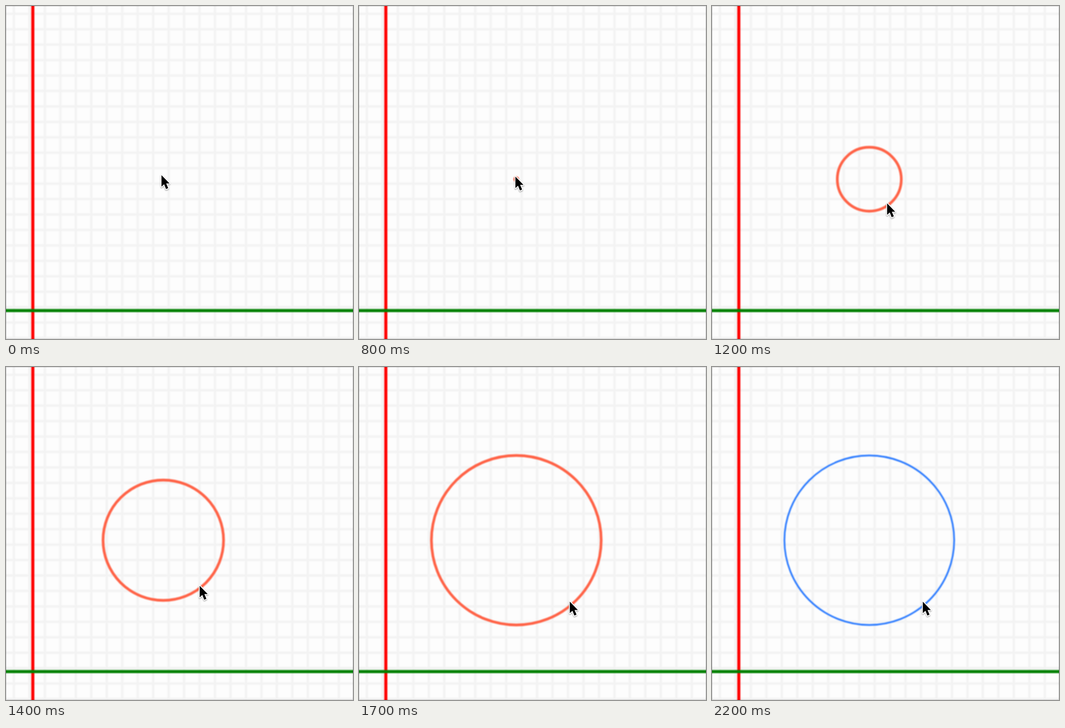
An HTML page for the animation above (2300 ms loop, 722 by 694 pixels).

```html
<!DOCTYPE html>
<html lang="en">
<head>
<meta charset="utf-8">
<style>
  html, body { margin: 0; width: 100%; height: 100%; overflow: hidden; background: #fdfdfd; }
  svg { display: block; }
</style>
</head>
<body>
<svg width="722" height="694" viewBox="0 0 722 694">
  <defs>
    <filter id="soft" filterUnits="userSpaceOnUse" x="-20" y="-20" width="762" height="734"
      color-interpolation-filters="sRGB">
      <feGaussianBlur stdDeviation="1"/>
    </filter>
    <filter id="shadow" x="-50%" y="-50%" width="200%" height="200%" color-interpolation-filters="sRGB">
      <feDropShadow dx="0" dy="1.5" stdDeviation="1.2" flood-color="#000" flood-opacity="0.35"/>
    </filter>
  </defs>
  <rect width="722" height="694" fill="#fdfdfd"/>
  <g filter="url(#soft)" fill="none">
    <path id="grid" stroke="#f3f3f3" stroke-width="5"/>
    <path d="M55.8-10V710" stroke="#f00" stroke-width="6.4"/>
    <path d="M-10 634.7H740" stroke="#008000" stroke-width="6.4"/>
    <circle id="anchor" cx="327" cy="361" r="5" fill="#ff6347" opacity="0.4"/>
    <circle id="ring" cx="327.3" cy="361"/>
  </g>
  <rect x="0.5" y="0.5" width="721" height="693" fill="none" stroke="#000" stroke-opacity="0.18"/>
  <g id="cursor" filter="url(#shadow)">
    <path d="M0.5 0.5V24.5L6 19.5L10 29.5L14.5 27.5L10.3 17.8H17.3Z"
      fill="#000" stroke="#fff" stroke-width="3.6" stroke-linejoin="round" paint-order="stroke"/>
  </g>
</svg>
<script>
  const LOOP = 2300, STEP = 100, DRAG_START = 700, PEAK = 1950, COMMIT = 2200;
  const byId = id => document.getElementById(id);
  const ring = byId('ring'), anchor = byId('anchor'), cursor = byId('cursor');

  let lines = '';
  for (let i = 0; i < 22; i++) {
    const offset = 32.18 * i;
    lines += `M${16.6 + offset}-10V710M-10 ${16.2 + offset}H740`;
  }
  byId('grid').setAttribute('d', lines);

  // The drag accelerates, then drifts slightly past the final size and back
  function radiusAt(t) {
    const growing = 66.6 * (Math.max(0, t - DRAG_START) / 500) ** 1.88;
    const settling = 181 - 7e-5 * (t - PEAK) ** 2;
    return t > DRAG_START ? Math.min(growing, settling) : 0;
  }

  function render(time) {
    const t = Math.floor(time % LOOP / STEP) * STEP;
    const radius = radiusAt(t);
    const committed = t >= COMMIT;
    // The pointer follows a slightly bent path as the circle grows
    const x = 323 + radius * (0.59 + 0.00035 * radius);
    const y = 352 + radius * (0.95 - 0.001 * radius);
    cursor.setAttribute('transform', `translate(${x} ${y})`);
    ring.setAttribute('r', radius);
    ring.setAttribute('stroke', committed ? '#2f7dff' : '#ff6347');
    ring.setAttribute('stroke-width', committed ? 3.6 : 5.6);
    ring.style.display = radius ? '' : 'none';
    anchor.style.display = radius ? 'none' : '';
  }

  const start = performance.now();
  function tick() {
    render(performance.now() - start);
    requestAnimationFrame(tick);
  }
  tick();
</script>
</body>
</html>
```
